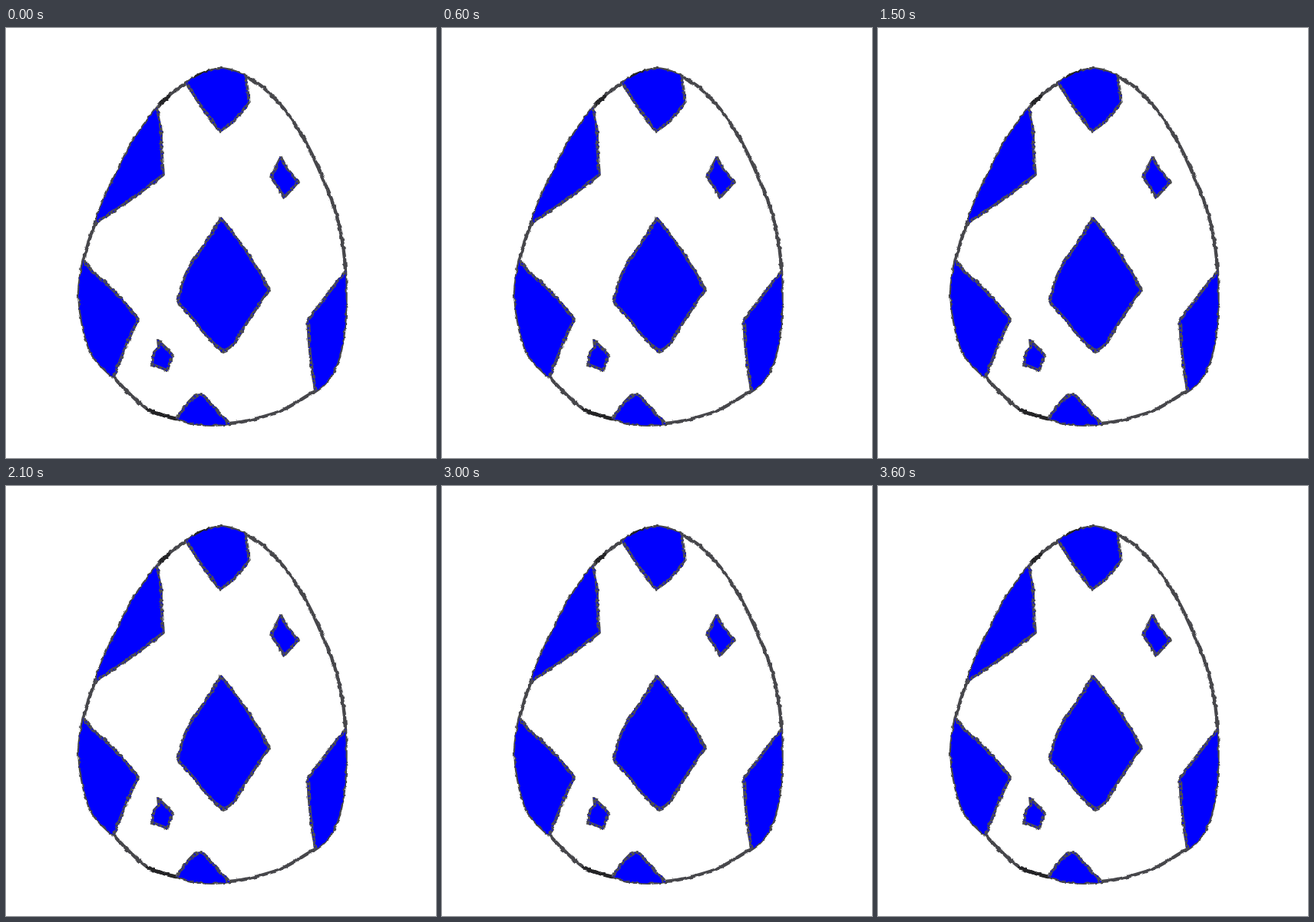
Recreate the animation shown at these times as an HTML page without scripts. Size 560 by 560 pixels, loop 4 s.

```html
<!DOCTYPE html>
<html lang="en">
<head>
<meta charset="utf-8">
<title>Wobbling egg</title>
<style>
  html, body { margin: 0; width: 100%; height: 100%; overflow: hidden; background: #fff; }
  svg { display: block; width: 100vw; height: 100vh; }
  .shell, .accent, .spots, .specks { stroke-linejoin: round; stroke-linecap: round; }
  .shell { fill: none; stroke: #47474b; stroke-width: 4.4; }
  .accent { fill: none; stroke: #242426; stroke-width: 4.4; }
  .spots { fill: #0000fe; stroke: #4c4c50; stroke-width: 3.8; }
  .specks { fill: none; stroke: #0000fe; stroke-width: 1.3; stroke-dasharray: 1 5; }

  .pose { filter: url(#pen); animation: 4s step-end infinite; }
  .upright { animation-name: upright; }
  .left { animation-name: left; }
  .right { animation-name: right; }
  @keyframes upright {
    0%, 37.5%, 75% { visibility: visible; }
    25%, 62.5% { visibility: hidden; }
  }
  @keyframes left {
    0%, 37.5% { visibility: hidden; }
    25% { visibility: visible; }
  }
  @keyframes right {
    0%, 75% { visibility: hidden; }
    62.5% { visibility: visible; }
  }
</style>
</head>
<body>
<svg viewBox="0 0 560 560">
  <defs>
    <!-- Slightly uneven felt-pen edges -->
    <filter id="pen" filterUnits="userSpaceOnUse" x="0" y="0" width="560" height="560" color-interpolation-filters="sRGB">
      <feTurbulence type="fractalNoise" baseFrequency=".15" numOctaves="2" seed="4"/>
      <feDisplacementMap in="SourceGraphic" scale="4" xChannelSelector="R" yChannelSelector="G"/>
    </filter>

    <!-- Shell outlines; spots run past them and are clipped -->
    <path id="shell-up" d="M278 53C302 54 318 66 332 75C368 104 392 148 407 183C424 220 440 260 442 317C443 350 444 400 431 437C424 455 414 466 403 473C385 482 372 494 352 501C330 508 310 514 291 515C270 518 245 517 223 509C208 506 195 502 185 497C165 483 150 465 140 455C128 444 116 433 111 423C103 405 97 380 95 345C96 325 98 315 101 302C106 282 110 270 116 254C124 232 130 216 138 202C146 185 152 172 160 157C171 138 184 120 196 104C210 88 225 77 236 71C252 60 264 55 278 53Z"/>
    <path id="shell-left" d="M238 56C256 56 262 62 272 66C320 88 360 130 382 165C410 205 425 250 435 291C443 325 450 355 449 388C448 405 446 418 443 427C432 445 424 452 415 459C385 482 350 498 318 512C290 521 265 522 245 519C212 512 185 498 163 481C120 452 98 395 96 331C97 315 98 300 100 288C108 235 128 170 158 120C168 105 180 93 190 83C204 65 222 57 238 56Z"/>
    <path id="shell-right" d="M315 56C332 58 342 66 352 74C385 102 415 148 431 190C445 230 453 280 453 333C452 370 447 415 437 445C434 455 430 462 425 468C413 480 400 488 390 491C355 504 320 514 284 519C255 519 230 515 212 507C185 496 160 475 142 449C118 425 107 390 106 350C107 325 110 305 117 288C120 272 126 258 132 244C160 190 195 135 231 98C245 88 258 79 270 71C286 58 300 55 315 56Z"/>

    <clipPath id="clip-up"><use href="#shell-up"/></clipPath>
    <clipPath id="clip-left"><use href="#shell-left"/></clipPath>
    <clipPath id="clip-right"><use href="#shell-right"/></clipPath>

    <g id="spots-up">
      <path d="M236 73Q255 106 279 135Q300 121 317 97L312 64L300 40H240Z"/>
      <path d="M196 104Q204 130 202 150L205 191Q160 227 117 254L80 240L170 90Z"/>
      <path d="M101 302L113 318Q140 338 172 379Q155 415 140 455L80 440L70 300Z"/>
      <path d="M442 317Q418 347 393 381Q395 430 403 473L460 480V317Z"/>
      <path d="M223 508Q232 492 245 480Q254 472 262 484L291 516L290 540H220Z"/>
      <path d="M280 248Q315 288 343 341Q318 375 300 407Q292 418 282 421Q262 405 247 383L224 357Q228 325 247 298Q265 273 280 248Z"/>
      <path d="M358 168Q366 186 381 200L362 221Q354 206 345 194Z"/>
      <path d="M198 407L217 425L210 446L190 438L193 422L199 416Z"/>
    </g>
    <g id="spots-left">
      <path d="M190 83L241 140Q260 125 274 101Q275 85 270 66V40L180 60Z"/>
      <path d="M158 120L181 205Q135 248 102 288L80 290L130 110Z"/>
      <path d="M96 331Q150 367 174 397Q166 440 163 481L80 490L70 331Z"/>
      <path d="M435 291Q410 325 398 361Q400 410 415 459H470V290Z"/>
      <path d="M246 519L274 475Q300 493 319 512L320 540H240Z"/>
      <path d="M262 248Q310 285 342 334Q325 385 295 423Q265 395 227 362Q235 290 262 248Z"/>
      <path d="M325 153L355 181L343 213L319 187L321 177Z"/>
      <path d="M208 418L234 433L227 461L205 446Z"/>
    </g>
    <g id="spots-right">
      <path d="M270 70L305 140Q325 130 345 112Q354 95 351 73L360 40H270Z"/>
      <path d="M231 98Q233 150 231 186Q180 218 132 244L110 240L210 80Z"/>
      <path d="M117 288Q148 318 156 338L173 371Q155 415 142 449H90V288Z"/>
      <path d="M453 333Q415 365 398 393Q391 430 390 491L440 510L480 333Z"/>
      <path d="M212 507L250 472Q268 492 284 519L270 540H210Z"/>
      <path d="M297 249Q330 290 353 353Q320 390 284 427Q262 390 232 350Q260 290 297 249Z"/>
      <path d="M382 174L405 207L384 236L367 205Z"/>
      <path d="M202 401L222 420L208 445L190 425Z"/>
    </g>
  </defs>

  <g class="pose upright">
    <use class="shell" href="#shell-up"/>
    <path class="accent" d="M185 497Q203 505 221 509M246 64Q255 59 264 57M202 98L212 89"/>
    <g clip-path="url(#clip-up)">
      <use class="spots" href="#spots-up"/>
      <use class="specks" href="#spots-up"/>
    </g>
  </g>

  <g class="pose left" visibility="hidden">
    <use class="shell" href="#shell-left"/>
    <path class="accent" d="M176 100L183 91M443 425L435 438M234 517L245 519M414 457L415 460M318 511L320 513"/>
    <g clip-path="url(#clip-left)">
      <use class="spots" href="#spots-left"/>
      <use class="specks" href="#spots-left"/>
    </g>
  </g>

  <g class="pose right" visibility="hidden">
    <use class="shell" href="#shell-right"/>
    <path class="accent" d="M250 85L258 79M269 68L270 72M427 465L418 474M198 501L208 505M390 490V493M283 518L285 520"/>
    <g clip-path="url(#clip-right)">
      <use class="spots" href="#spots-right"/>
      <use class="specks" href="#spots-right"/>
    </g>
  </g>
</svg>
</body>
</html>
```
